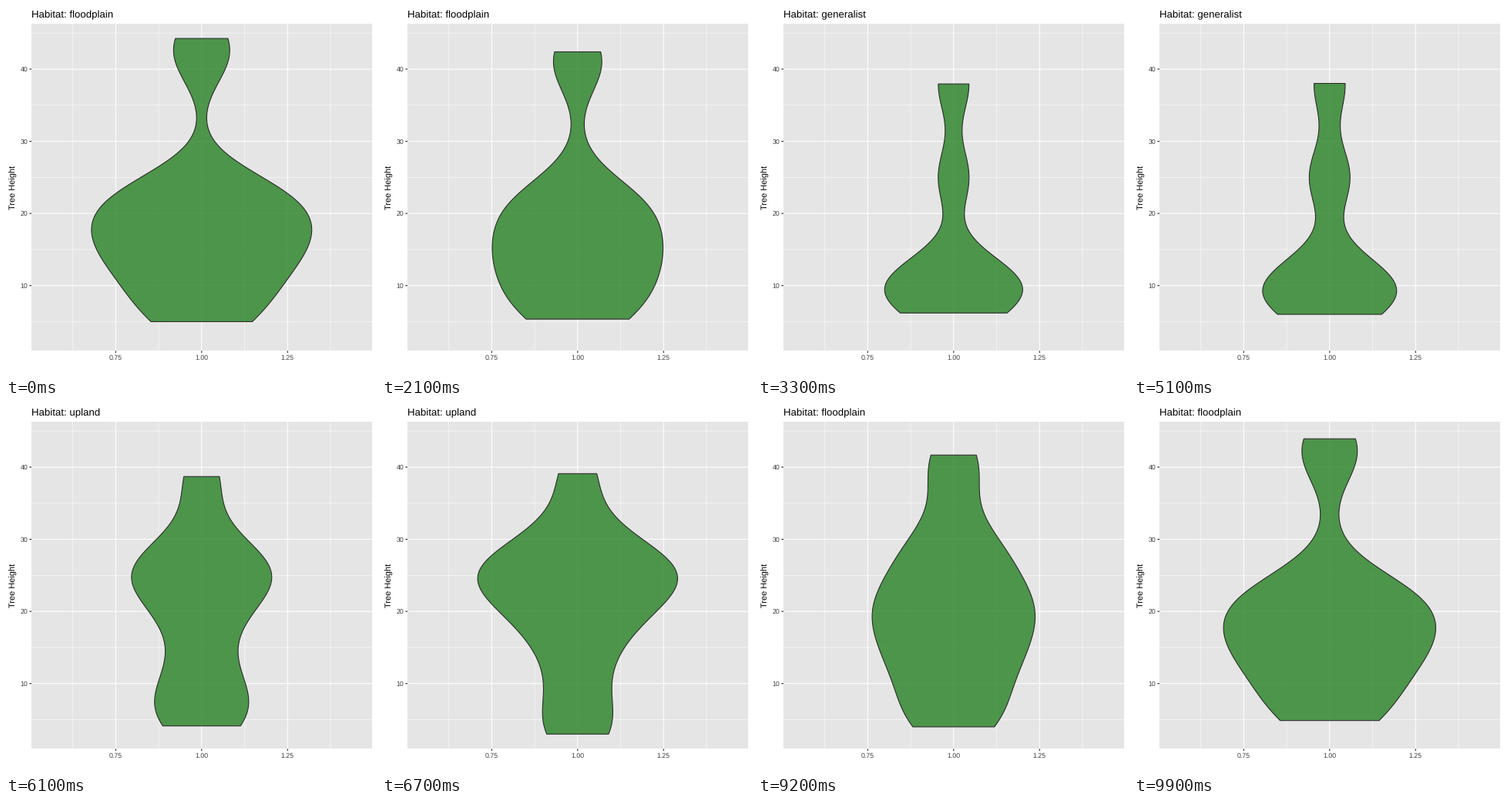
These frames come from a looping animation (480 px wide and 480 px high, 10 s). A matplotlib script:

```python
import numpy as np
import matplotlib.pyplot as plt
from matplotlib.animation import FuncAnimation
from matplotlib.patches import Polygon, Rectangle

SIZE, DPI = 480, 72
FRAMES, INTERVAL = 100, 100
FIRST, CYCLE, MOVE = 16, 34, 17  # first move, move plus rest, move (frames)
LEFT, RIGHT, TOP, BOTTOM = 33.2, 474.5, 22.8, 447.3
MID = 253.8
BANDWIDTH, SCALE = 4.05, 80
INK, LABEL = "#272727", "#404040"

# Tree heights found in each habitat
TREES = {
    "floodplain": [5, 5.8, 8.5, 11, 12.5, 13.8, 16, 16.5, 17.5, 19.2,
                   21, 22, 23, 24, 41, 44.25],
    "generalist": [6.2, 8.6, 9.6, 10.6, 11.6, 25, 37.95],
    "upland": [3, 5.2, 10.8, 15.5, 18.5, 20.5, 22.5, 24, 25, 26,
               27, 27.8, 32, 39.1],
}
NAMES = list(TREES)


def x_px(v):
    return MID + (v - 1) * 446


def y_px(h):
    return 456.3 - 9.36 * h


def violin_shape(heights):
    """Heights and half widths of a trimmed kernel density."""
    h = np.linspace(min(heights), max(heights), 256)
    z = (h[:, None] - np.array(heights)) / BANDWIDTH
    return h, SCALE / BANDWIDTH * np.exp(-z**2 / 2).sum(axis=1)


SHAPES = [np.array(violin_shape(t)) for t in TREES.values()]


def pose(frame):
    """Current state, next state and progress between them."""
    i, k = divmod(frame - FIRST, CYCLE)
    length = min(MOVE, FRAMES - FIRST - CYCLE * i)
    return i % 3, (i + 1) % 3, min(1, k / length)


plt.rcParams["font.family"] = "Liberation Sans"
plt.rcParams["text.hinting"] = "no_hinting"
fig = plt.figure(figsize=(SIZE / DPI, SIZE / DPI), dpi=DPI, facecolor="white")
ax = fig.add_axes([0, 0, 1, 1])
ax.set_xlim(0, SIZE)
ax.set_ylim(SIZE, 0)
ax.axis("off")

ax.add_patch(Rectangle((LEFT, TOP), RIGHT - LEFT, BOTTOM - TOP,
                       fc="#e5e5e5", lw=0, zorder=0))


def line(xs, ys, color="white", width=1.07):
    ax.plot(xs, ys, color=color, lw=width, zorder=1, snap=False,
            solid_capstyle="butt")


def grid(xs, hs, width):
    for h in hs:
        line([LEFT, RIGHT], [y_px(h)] * 2, width=width)
    for v in xs:
        line([x_px(v)] * 2, [TOP, BOTTOM], width=width)


x_ticks, y_ticks = np.arange(0.75, 1.3, 0.25), np.arange(10, 41, 10)
grid(np.arange(0.625, 1.4, 0.25), np.arange(5, 46, 10), 0.53)
grid(x_ticks, y_ticks, 1.07)

for h in y_ticks:
    line([LEFT - 2.8, LEFT], [y_px(h)] * 2, INK)
    ax.text(28.2, y_px(h) + 3.2, str(h), size=8.8, color=LABEL,
            ha="right", va="baseline")
for v in x_ticks:
    line([x_px(v)] * 2, [BOTTOM, BOTTOM + 2.8], INK)
    ax.text(x_px(v), 459, f"{v:.2f}", size=8.8, color=LABEL,
            ha="center", va="baseline")
ax.text(15.5, 235, "Tree Height", size=11, rotation=90,
        ha="right", va="center")
title = ax.text(33, 15, "", size=13.2, va="baseline")

violin = Polygon([(0, 0)], closed=True, fc=(0.149, 0.506, 0.137, 0.8),
                 ec=INK, lw=1.07, joinstyle="round", zorder=3)
ax.add_patch(violin)


def draw(frame):
    a, b, t = pose(frame)
    h, w = SHAPES[a] * (1 - t) + SHAPES[b] * t
    y = y_px(h)
    violin.set_xy(np.column_stack([np.r_[MID - w, MID + w[::-1]],
                                   np.r_[y, y[::-1]]]))
    title.set_text("Habitat: " + NAMES[b if t >= 0.5 else a])
    return violin, title


anim = FuncAnimation(fig, draw, frames=FRAMES, interval=INTERVAL,
                     repeat=True, repeat_delay=0)
plt.show()
```
